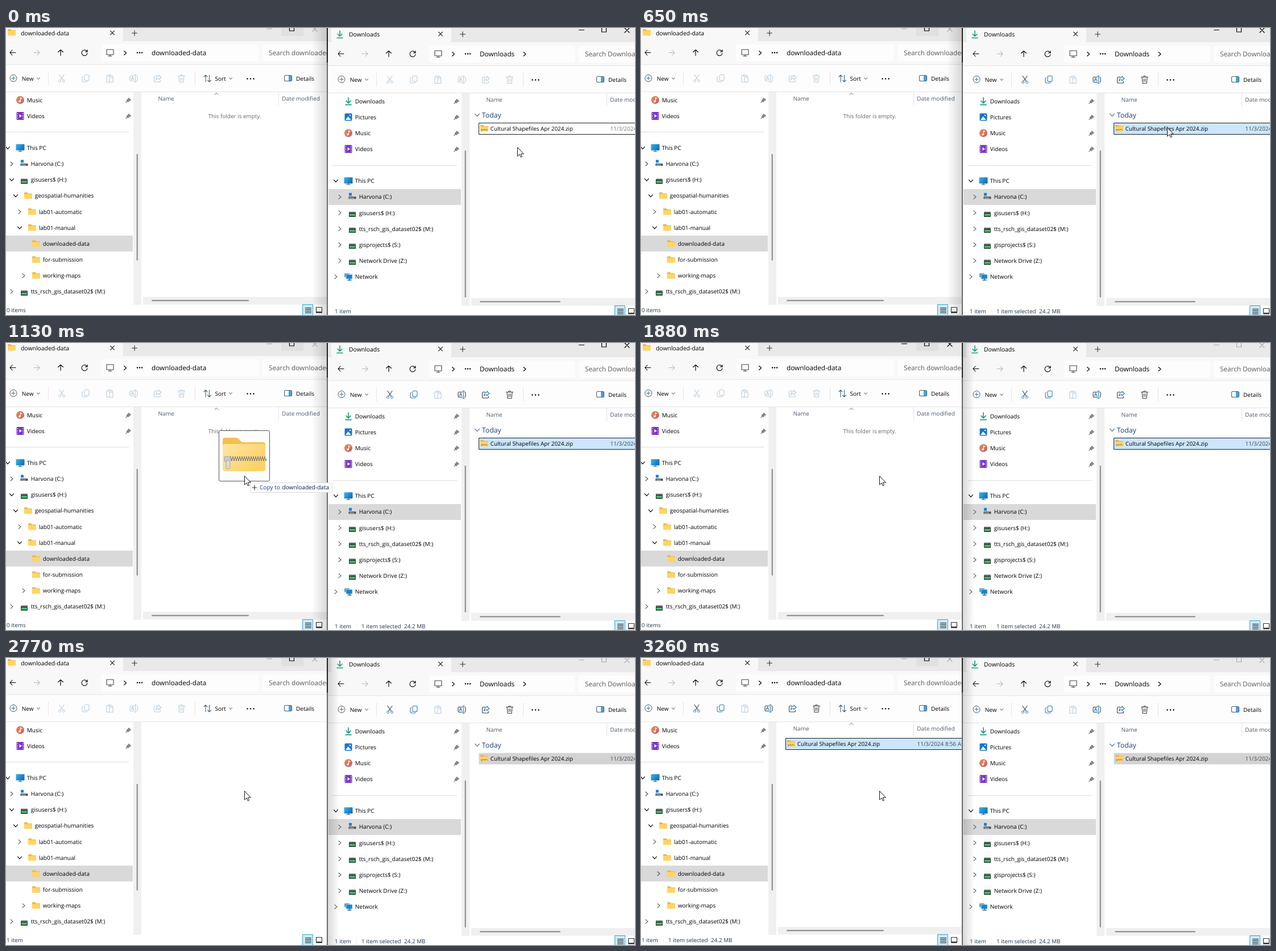
An HTML page with a canvas for the animation above (3500 ms loop, 1106 by 506 pixels).

```html
<!DOCTYPE html>
<html lang="en">
<head>
<meta charset="utf-8">
<title>Copying a file between two folders</title>
<style>
html, body { margin: 0; width: 100%; height: 100%; overflow: hidden; background: #fff; }
canvas { display: block; }
</style>
</head>
<body>
<canvas id="stage" width="1106" height="506"></canvas>
<script>
const ctx = document.getElementById('stage').getContext('2d');
const LOOP = 3500, STEP = 28.15;
const INK = '#000', DIM = '#b4b4b4', PALE = '#b9cddd', BLUE = '#2d7db8', GREY = '#555', STATUS = '#1f3550';
const FILE = 'Cultural Shapefiles Apr 2024.zip', DATE = '11/3/2024 8:56 AM';

function rect(x, y, w, h, fill) {
  ctx.fillStyle = fill;
  ctx.fillRect(x, y, w, h);
}

function box(x, y, w, h, r, fill, stroke, lw = 1) {
  ctx.beginPath();
  ctx.roundRect(x, y, w, h, r);
  if (fill) { ctx.fillStyle = fill; ctx.fill(); }
  if (stroke) { ctx.strokeStyle = stroke; ctx.lineWidth = lw; ctx.stroke(); }
}

// Draws an SVG path around the point (x, y).
function path(d, x, y, stroke, lw = 1, fill) {
  const p = new Path2D(d);
  ctx.save();
  ctx.translate(x, y);
  ctx.lineCap = ctx.lineJoin = 'round';
  if (fill) { ctx.fillStyle = fill; ctx.fill(p); }
  if (stroke) { ctx.strokeStyle = stroke; ctx.lineWidth = lw; ctx.stroke(p); }
  ctx.restore();
}

function text(s, x, y, size = 10.05, color = INK) {
  ctx.font = `${size}px "Open Sans", "Noto Sans", sans-serif`;
  ctx.fillStyle = color;
  ctx.fillText(s, x, y + size * 0.36);
}

function circle(x, y, r, fill, stroke) {
  box(x - r, y - r, 2 * r, 2 * r, r, fill, stroke);
}

function dots(x, y, gap) {
  for (const i of [-1, 0, 1]) circle(x + i * gap, y, 1.2, INK);
}

function gradient(x0, y0, x1, y1, from, to) {
  const g = ctx.createLinearGradient(x0, y0, x1, y1);
  g.addColorStop(0, from);
  g.addColorStop(1, to);
  return g;
}

const chevronRight = (x, y, c = GREY) => path('M-2 -3.5L2 0L-2 3.5', x, y, c, 1.1);
const chevronDown = (x, y, c = INK, k = 1) => path(`M${-3.5 * k} ${-2 * k}L0 ${2 * k}L${3.5 * k} ${-2 * k}`, x, y, c, 1.1);

const icons = {
  folder(x, y) {
    path('M-7 -5Q-7 -6 -6 -6H-2L0 -4H6Q7 -4 7 -3V5H-7Z', x, y, null, 1, '#f0b73a');
    box(x - 7, y - 3, 14, 8.5, 1, '#ffd466');
  },
  zip(x, y) {
    icons.folder(x, y);
    for (let i = -6; i < 6; i += 2) rect(x + i, y + (i % 4 ? 1 : 2), 1.5, 1.5, '#8b7440');
    rect(x - 6, y + 1, 2, 4, '#aaa');
  },
  music(x, y) {
    circle(x, y, 7, gradient(x - 6, y - 6, x + 6, y + 6, '#e88a4a', '#c95f72'));
    circle(x - 1, y + 2.5, 1.8, '#fff');
    path('M.5 2.5V-4L3 -2.5', x, y, '#fff', 1.2);
  },
  video(x, y) {
    box(x - 6.5, y - 7, 13, 14, 1.5, '#7a35c4');
    for (let i = -5; i < 7; i += 4) {
      rect(x - 5.5, y + i, 1.5, 2, '#d6b8f4');
      rect(x + 4, y + i, 1.5, 2, '#d6b8f4');
    }
    path('M-1.5 -3L3 0L-1.5 3Z', x, y, null, 1, '#fff');
  },
  picture(x, y) {
    box(x - 6.5, y - 6.5, 13, 13, 1.5, '#1976c9');
    path('M-5 5L-.5 -1L5 5Z', x, y, null, 1, '#fff');
    circle(x + 3, y - 3, 1.2, '#fff');
  },
  download(x, y) {
    path('M0 -6V3M-4 -.5L0 3.5L4 -.5M-5 6.5H5', x, y, '#159a7e', 1.6);
  },
  pc(x, y) {
    box(x - 7.5, y - 6.5, 15, 11, 1, gradient(x - 7, y - 6, x + 7, y + 5, '#35b5e8', '#0b62b5'));
    rect(x - 1.5, y + 4.5, 3, 2, '#777');
    rect(x - 4, y + 6, 8, 1, '#777');
  },
  system(x, y) {
    rect(x - 6, y - 7, 5, 5, '#1583d8');
    box(x - 6.5, y - 0.5, 13, 4, 0.5, '#4e565c');
    rect(x - 5, y + 1.5, 8, 1, '#d8e4ea');
  },
  drive(x, y) {
    box(x - 6, y - 2, 12, 4, 0.5, '#666');
    box(x - 6, y + 0.5, 12, 6.5, 0.5, '#2c3a33');
    rect(x - 5, y + 2, 10, 3.2, '#3fce72');
  },
  network(x, y) {
    box(x - 7, y - 6, 9, 7, 1, '#5b9fc4');
    box(x - 4, y - 4, 11, 8, 1, '#1287cf', '#cfeafa', 0.7);
    path('M-1 6H5M2 4V6', x, y, '#3f5c70', 1.4);
  },
};

const leftNav = [
  ['Music', 'music'], ['Videos', 'video'], null,
  ['This PC', 'pc', 0, 'v'], ['Harvona (C:)', 'system', 1, '>'], ['gisusers$ (H:)', 'drive', 1, 'v'],
  ['geospatial-humanities', 'folder', 2, 'v'], ['lab01-automatic', 'folder', 3, '>'],
  ['lab01-manual', 'folder', 3, 'v'], ['downloaded-data', 'folder', 4], ['for-submission', 'folder', 4],
  ['working-maps', 'folder', 4, '>'], ['tts_rsch_gis_dataset02$ (M:)', 'drive', 1, '>'],
];
const rightNav = [
  ['Downloads', 'download'], ['Pictures', 'picture'], ['Music', 'music'], ['Videos', 'video'], null,
  ['This PC', 'pc', 0, 'v'], ['Harvona (C:)', 'system', 1, '>'], ['gisusers$ (H:)', 'drive', 1, '>'],
  ['tts_rsch_gis_dataset02$ (M:)', 'drive', 1, '>'], ['gisprojects$ (S:)', 'drive', 1, '>'],
  ['Network Drive (Z:)', 'drive', 1, '>'], ['Network', 'network', 0, '>'],
];

function navigation(items, selected, expandable) {
  items.forEach((item, i) => {
    const y = 126.9 + i * STEP;
    if (!item) return rect(-3, Math.round(y), 219, 1, '#dcdcdc');
    const [label, icon, depth, arrow] = item, dx = 7 * (depth || 0);
    if (i === selected) rect(-10, Math.round(y) - 14, 233, 28, '#d9d9d9');
    if (arrow === 'v') chevronDown(3 + dx, y);
    if (arrow === '>' || (i === selected && expandable)) chevronRight(3 + dx, y);
    icons[icon](25 + dx, y);
    text(label, 36.7 + dx, y);
    if (depth === undefined) {
      path('M1 -4L4.5 -.5L2.5 0L0 3L-3 0L0 -2.5Z', 215, y + 0.5, GREY, 0.8, '#8a8a8a');
      path('M-1.5 1.5L-4 4', 215, y + 0.5, GREY, 1.1);
    }
  });
}

function toolbar(enabled) {
  const y = 89, line = enabled ? '#3c4146' : PALE, accent = enabled ? BLUE : PALE;
  circle(13, y - 0.5, 6, null, '#555');
  path('M-3 0H3M0 -3V3', 13, y - 0.5, BLUE, 1.1);
  text('New', 27.8, y);
  chevronDown(57, y, '#888', 0.7);
  rect(74, 77, 1, 24, '#e6e6e6');
  path('M-4 -6.5L2.5 3M4 -6.5L-2.5 3', 98, y, line, 1.1);
  circle(94.5, y + 4.5, 2, null, accent);
  circle(101.5, y + 4.5, 2, null, accent);
  box(138, y - 6.5, 8, 10, 2, null, accent, 1.1);
  path('M-4.5 -3.5Q-6 -3 -6 -1V3.5Q-6 6 -3.5 6H1Q2.5 6 3 5', 140, y, accent, 1.1);
  path('M-2 -5H-5V6.5H-1M2 -5H5V-3M-2 -6.5H2V-4H-2ZM0 -2H6V6.5H0Z', 182, y, PALE, 1.1);
  path('M1 -4.5H-5Q-6.5 -4.5 -6.5 -3V3Q-6.5 4.5 -5 4.5H1M5 -4.5Q6.5 -4.5 6.5 -3V3Q6.5 4.5 5 4.5', 224.5, y, line, 1.1);
  path('M3 -6.5V6.5M1.5 -6.5H4.5M1.5 6.5H4.5M-4.5 2.5L-2 -3L.5 2.5M-3.5 .8H-.5', 224.5, y, accent, 1.1);
  path('M-1 -4.5H-4Q-6 -4.5 -6 -2.5V4Q-6 6 -4 6H3Q5 6 5 4V3', 266.5, y, line, 1.1);
  path('M2 -6L6.5 -2L2 2V0Q-1.5 0 -3 2.5Q-2.5 -3.5 2 -4Z', 266.5, y, accent, 1.1);
  path('M-6 -4.5H6M-2 -4.5Q-2 -6.5 0 -6.5Q2 -6.5 2 -4.5M-4.5 -4.5L-3.5 6.5H3.5L4.5 -4.5M-1.3 -1.5V3.5M1.3 -1.5V3.5', 308.5, y, line, 1.1);
  rect(332, 77, 1, 24, '#e6e6e6');
}

function fileRow(y, style) {
  const fills = { outline: '#fff', hover: '#d9edfc', selected: '#cbe6fd', dimmed: '#d3d3d3', plain: '#fff' };
  const border = style === 'plain' || style === 'dimmed' ? null : '#1c2024';
  box(254.5, y - 10, 330, 20, 0, fills[style], border);
  icons.zip(264, y - 0.5);
  text(FILE, 274.8, y, 9.85);
  text(DATE, 485.5, y, 9.85, style === 'outline' ? '#777' : '#40464d');
}

function windowFrame(w) {
  const { edge } = w, controls = w.active ? INK : '#aaa';
  rect(-11, 0, 600, 506, '#fff');
  rect(-11, -2, 600, 25, '#e9e9e9');
  box(w.tabLeft, -8, 206 - w.tabLeft, 32, 5, '#f8f8f8');
  rect(-11, 23, 600, 42, '#f8f8f8');
  icons[w.tabIcon](10, w.tabIcon === 'folder' ? 8 : 9);
  text(w.title, 26, 9.2, 10.4);
  path('M-3.5 -3.5L3.5 3.5M3.5 -3.5L-3.5 3.5', 187, 8.5, '#333', 1.1);
  path('M-4.5 0H4.5M0 -4.5V4.5', 226, 9, '#333', 1.1);

  if (w.hoverMax) rect(484, 0, 39, 14, '#e0e0e0');
  path('M-4.5 0H4.5', 463 + edge, 1.5, controls, 1.2);
  path('M-4 -6V4H4V-6', 502.5 + edge, 1, w.hoverMax ? INK : controls, 1.2);
  path('M-4 -4L4 4M4 -4L-4 4', 543 + edge, 2, controls, 1.2);

  // Address row
  const field = w.fieldEnd;
  box(167, 29, field - 167, 30, 4, '#fdfdfd');
  box(field + 7, 29, 170, 30, 4, '#fdfdfd');
  path('M5 0H-5M-1 -4.5L-5 0L-1 4.5', 12, 43.5, INK, 1.1);
  path('M-5 0H5M1 -4.5L5 0L1 4.5', 54, 43.5, DIM, 1.1);
  path('M0 5V-5M-4.5 -1L0 -5L4.5 -1', 96, 43.5, INK, 1.1);
  path('M4.5 -2A5 5 0 1 0 5 1M5 -5V-1.5H1.5', 138, 43.5, INK, 1.1);
  path('M-6 -5.5H6V3.5H-6ZM-3 6H3M0 3.5V6', 183, 43.5, '#444', 1.1);
  chevronRight(209.5, 44, INK);
  dots(235, 43.5, 4);
  text(w.title, 256, 44, 11.75);
  if (w.isRoot) chevronRight(335, 44, INK);
  text('Search ' + w.title, field + 18, 44, 11.75, '#5a5a5a');

  rect(-11, 65, 600, 47, '#fdfdfd');
  rect(-11, 64, 600, 1, '#e7e7e7');
  rect(-11, 112, 600, 1, '#e3e3e3');
  toolbar(w.enabled);
  if (w.sort) {
    path('M-3 6V-6M-6 -3L-3 -6L0 -3M3.5 -6V6M.5 3L3.5 6L6.5 3', 354, 89, '#45647c', 1.1);
    text('Sort', 367.5, 89);
    chevronDown(395, 89, '#888', 0.7);
  }
  dots(w.sort ? 430 : 354, 89.5, 5.5);
  box(489.5 + edge, 83.5, 13, 10, 2, null, '#45647c', 1.1);
  rect(497 + edge, 84, 5, 9, '#4ba0dc');
  text('Details', 510 + edge, 89);

  // Panes
  navigation(w.nav, w.selected, w.expandable);
  rect(224, 113, 14, 375, '#f0f0f0');
  box(229.7, w.thumb[0], 2, w.thumb[1], 1, '#858585');
  if (w.listed) {
    text('Name', 267.5, 124.5, 10.05, '#4c5a6e');
    rect(479, 113, 1, 23, '#e3e3e3');
    text('Date modified', 485.3, 124.5, 10.05, '#4c5a6e');
    rect(241, 474, 350, 13.5, '#f0f0f0');
    box(256, 479.6, w.scrollEnd - 256, 2, 1, '#858585');
  }

  // Status bar
  text(w.count, 1, 497.5, 9.9, STATUS);
  if (w.enabled || w.status) {
    rect(39, 491, 1, 12, '#f0f0f0');
    text('1 item selected', 48, 497.5, 9.9, STATUS);
    text('24.2 MB', 123, 497.5, 9.9, STATUS);
  }
  box(521.5 + edge, 487.5, 18, 20, 0, '#c9ebfb', '#3fa3d8');
  for (let i = 0; i < 4; i++) rect(526 + edge, 493 + i * 2.8, 11, 1.2, '#333');
  box(545.5 + edge, 492.5, 10, 8, 0.5, '#fff', '#333', 1.2);
  rect(545 + edge, 501, 11, 1.5, '#333');
}

// Soft shadow cast by the front window, from x0 (dark) to x1 (clear).
function shadow(x0, x1) {
  rect(Math.min(x0, x1), 0, Math.abs(x1 - x0), 506, gradient(x0, 0, x1, 0, 'rgba(0,0,0,.15)', 'rgba(0,0,0,0)'));
}

function leftWindow(t) {
  ctx.save();
  ctx.beginPath();
  ctx.rect(0, 0, 564, 506);
  ctx.clip();
  const listed = t < 2770 || t >= 2850;
  windowFrame({
    title: 'downloaded-data', tabIcon: 'folder', tabLeft: -20, edge: 0, fieldEnd: 444, sort: true, hoverMax: true,
    active: t >= 1880 && t < 2110, enabled: t >= 3185, status: t >= 3110, expandable: t >= 3110,
    nav: leftNav, selected: 9, thumb: [222, 188], scrollEnd: 427, listed,
    count: t < 2770 ? '0 items' : '1 item',
  });
  if (listed) path('M-3 1.5L0 -1.5L3 1.5', 370, 116, '#666', 1);
  if (t < 2770) text('This folder is empty.', 355.5, 155.5, 9.95, '#666');
  else if (listed) fileRow(151.5, t < 3110 ? 'plain' : 'selected');
  ctx.restore();
}

function rightWindow(t) {
  ctx.save();
  ctx.translate(577, 2);
  windowFrame({
    title: 'Downloads', tabIcon: 'download', tabLeft: -5, edge: -28, fieldEnd: 423, isRoot: true,
    active: t < 1880, enabled: t >= 650, nav: rightNav, selected: 6,
    thumb: [214, 259], scrollEnd: 398, listed: true, count: '1 item',
  });
  chevronDown(251.5, 151.5, '#4b6591', 1.1);
  text('Today', 259.8, 151.5, 12.3, '#1f3d70');
  fileRow(175.5, t < 150 ? 'outline' : t < 650 ? 'hover' : t < 1960 ? 'selected' : 'dimmed');
  ctx.restore();
}

function dragImage(x, y) {
  box(x - 44.5, y - 80.5, 89, 89, 2, '#fdfdfd', '#555');
  const fx = x - 38, fy = y - 68;
  path('M0 4Q0 0 4 0H23Q26 0 28 2L34 8H71Q75 8 75 12V40H0Z', fx, fy, null, 1, '#f2c04c');
  box(fx, fy + 11, 75, 48, 4, gradient(fx, fy + 10, fx + 50, fy + 60, '#ffe6a2', '#fcd268'));
  rect(fx + 12, fy + 36.5, 63, 1, '#a5966c');
  for (let i = 13; i < 74; i += 4) {
    rect(fx + i, fy + 33, 2, 4, '#85857f');
    rect(fx + i + 2, fy + 37, 2, 4, '#85857f');
  }
  box(fx + 3, fy + 33, 11, 9, 2, '#c6ccd1', '#90979d', 0.8);
  box(fx + 6, fy + 40, 7, 15, 2, '#d9dee2', '#979ea4', 0.8);
  box(fx + 8, fy + 48, 3, 4, 1, '#f8d377');

  box(x + 10.5, y + 11.5, 144, 17, 2, '#fff', '#dadada');
  path('M-4 0H4M0 -4V4', x + 18, y + 20, '#333', 1.2);
  text('Copy to', x + 27, y + 19.5, 10.1, '#123a96');
  text('downloaded-data', x + 66.5, y + 19.5, 10.1, '#0a1a55');
}

// [start time, x, y] of the pointer tip
const pointer = [
  [0, 899, 211], [80, 914, 192], [150, 925, 176], [730, 850, 179], [810, 742, 187],
  [900, 629, 198], [970, 540, 212], [1050, 455, 228], [1130, 419, 235],
];

function draw(t) {
  leftWindow(t);
  rightWindow(t);
  if (t < 1880) shadow(564, 538);
  else shadow(566, 586);
  rect(564, 0, 2, 506, '#6a6a6a');
  rect(564, 0, 2, 61, '#222');
  const [, x, y] = pointer.findLast(p => p[0] <= t);
  if (t >= 970 && t < 1880) dragImage(x, y);
  path('M0 0V15L3.6 11.8L5.8 16.8L8 15.9L5.8 11H10.4Z', x + 0.5, y, '#111', 1, '#fff');
}

function frame() {
  ctx.textRendering = 'geometricPrecision';
  draw(performance.now() % LOOP);
  requestAnimationFrame(frame);
}
frame();
</script>
</body>
</html>
```
